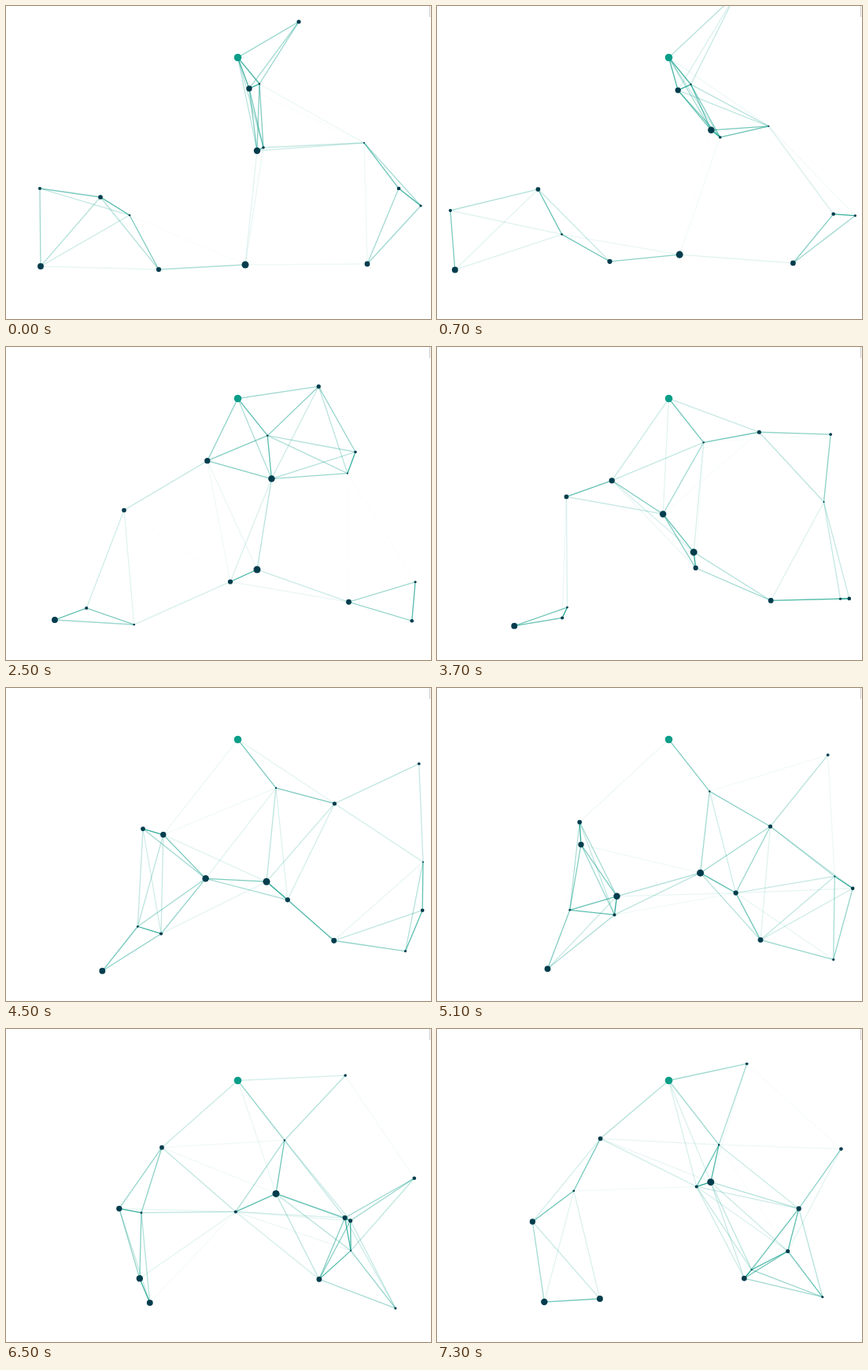
An HTML page with a canvas for the animation above (7400 ms loop, 540 px wide and 398 px high).

```html
<!DOCTYPE html>
<html lang="en">
<head>
<meta charset="utf-8">
<title>Drifting network</title>
<style>
  html, body { margin: 0; width: 100%; height: 100%; overflow: hidden; background: #fff; }
  canvas { display: block; width: 540px; height: 398px; }
</style>
</head>
<body>
<canvas id="stage" width="540" height="398"></canvas>
<script>
const ctx = document.getElementById("stage").getContext("2d");
const LOOP = 7400;
const STEP = 100;
const SUBSTEP = 10;
const REACH = 166;
const TEAL = "#0a9d88";
const DARK = "#023d4d";
const BOX = { left: 11.3, right: 533, top: -28, bottom: 364.3 };

// Start point and drift in px/s, from the largest node to the smallest.
const starts = [
  [294.5, 65.5, 0, 0],
  [304, 329, 6, -18.4],
  [319, 184, 41.9, -37.4],
  [44, 331, -30.2, 6.4],
  [309, 105, 28, -20.9],
  [459, 328, -9.4, -1.5],
  [194, 335, 36.4, -14.6],
  [120, 243, 12, -14.2],
  [372, 20, 10.1, -48.4],
  [499, 232, 6.7, 46.5],
  [43, 232, -47.4, 40],
  [327, 180, 46.8, -18.6],
  [527, 254, 6.3, 17.9],
  [157, 266, 2.3, 34.8],
  [322, 99, -5.4, -7.2],
  [455, 174, -48, -30.3]
];

const nodes = starts.map(([x, y, vx, vy], i) => {
  const size = 1 - i / (starts.length - 1);
  return { x, y, vx, vy, r: 1 + 3.8 * size ** 1.15, clock: 0, dir: 1 };
});

// Reflects a coordinate between two walls.
function bounce(v, min, max) {
  const span = max - min;
  const d = (((v - min) % (2 * span)) + 2 * span) % (2 * span);
  return min + (d > span ? 2 * span - d : d);
}

function place({ x, y, vx, vy, r, clock }) {
  return {
    x: bounce(x + vx * clock, BOX.left + r, BOX.right - r),
    y: bounce(y + vy * clock, BOX.top + r, BOX.bottom - r),
    r
  };
}

const gap = (a, b) => Math.hypot(a.x - b.x, a.y - b.y);

function eachPair(list, visit) {
  for (let i = 0; i < list.length; i++) {
    for (let j = i + 1; j < list.length; j++) visit(list[i], list[j], i, j);
  }
}

// A node that runs into a larger one sends both back the way they came.
function turnOnContact(points) {
  eachPair(points, (a, b, i, j) => {
    if (gap(a, b) < a.r) {
      nodes[i].dir *= -1;
      nodes[j].dir *= -1;
    }
  });
}

function simulate() {
  const poses = [];
  for (let ms = 0; ms < LOOP; ms += SUBSTEP) {
    const points = nodes.map(place);
    if (ms % STEP === 0) poses.push(points);
    turnOnContact(points);
    for (const n of nodes) n.clock += n.dir * SUBSTEP / 1000;
  }
  return poses;
}

function drawLinks(points) {
  ctx.strokeStyle = TEAL;
  ctx.lineWidth = 1.3;
  eachPair(points, (a, b) => {
    const alpha = 1 - gap(a, b) / REACH;
    if (alpha <= 0) return;
    ctx.globalAlpha = alpha;
    ctx.beginPath();
    ctx.moveTo(a.x, a.y);
    ctx.lineTo(b.x, b.y);
    ctx.stroke();
  });
  ctx.globalAlpha = 1;
}

function drawNodes(points) {
  points.forEach((p, i) => {
    ctx.fillStyle = i === 0 ? TEAL : DARK;
    ctx.beginPath();
    ctx.arc(p.x, p.y, p.r, 0, Math.PI * 2);
    ctx.fill();
  });
}

function draw(points) {
  ctx.fillStyle = "#fff";
  ctx.fillRect(0, 0, 540, 398);
  drawLinks(points);
  drawNodes(points);
  ctx.fillStyle = "#c8c8c8";
  ctx.fillRect(538, 0, 1, 14);
}

const poses = simulate();
const start = performance.now();
function tick() {
  const ms = (performance.now() - start) % LOOP;
  draw(poses[Math.floor(ms / STEP)]);
  requestAnimationFrame(tick);
}
tick();
</script>
</body>
</html>
```
